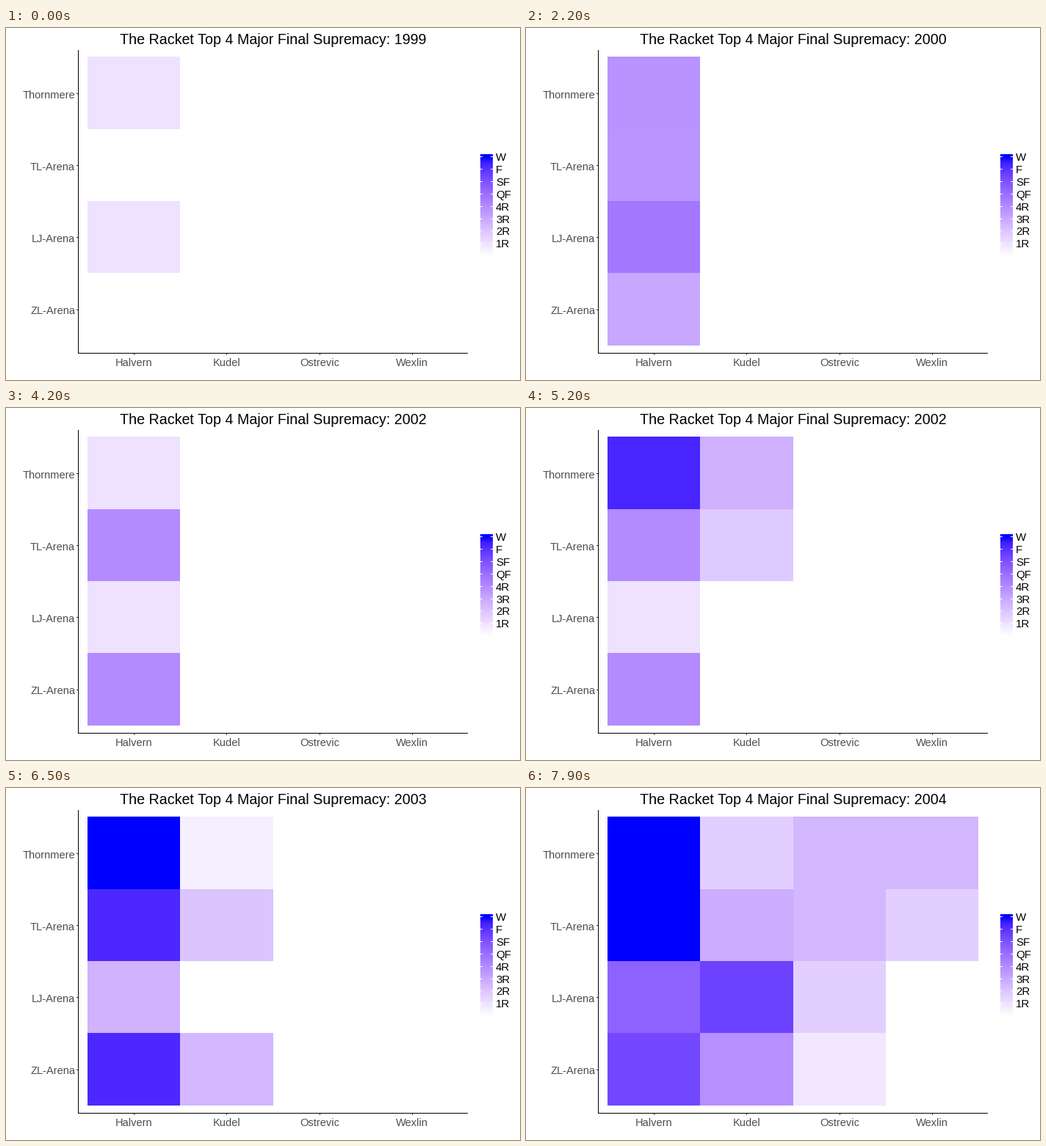
A matplotlib script for the animation above (8000 ms loop, 700 by 480 pixels).

```python
import numpy as np
import matplotlib.pyplot as plt
from matplotlib.animation import FuncAnimation
from matplotlib.patches import Rectangle

W, H, DPI = 700, 480, 100
INTERVAL, FRAMES, FRAMES_PER_YEAR = 100, 80, 14
FIRST_YEAR = 1999
TITLE = "The Racket Top 4 Major Final Supremacy: {}"

PLAYERS = ["Halvern", "Kudel", "Ostrevic", "Wexlin"]
EVENTS = ["Thornmere", "TL-Arena", "LJ-Arena", "ZL-Arena"]
ROUNDS = ["W", "F", "SF", "QF", "4R", "3R", "2R", "1R"]

# One string per player and year: round reached (8 = won) in event order.
RESULTS = [
    ["1010", "0000", "0000", "0000"],
    ["1343", "0000", "0000", "0000"],
    ["5453", "0000", "0000", "0000"],
    ["1414", "0000", "0000", "0000"],
    ["8414", "3200", "0000", "0000"],
    ["8838", "0203", "0000", "0000"],
    ["8866", "2384", "3321", "3200"],
]
scores = np.array([[[int(c) for c in player] for player in year]
                   for year in RESULTS], float)

X_EDGES = [111, 237, 364, 490, 616]
Y_EDGES = [39, 138, 236, 334, 433]
AXIS_LEFT, AXIS_RIGHT, AXIS_TOP, AXIS_BOTTOM = 98, 629, 30, 443
BAR_LEFT, BAR_RIGHT, BAR_BINS = 646, 663, 20
TICK_TOP, TICK_STEP = 175.95, 16.82

WHITE_LAB = np.array([100.0, 0.0, 0.0])
BLUE_LAB = np.array([32.30, 79.19, -107.86])
XYZ_TO_RGB = np.array([[3.2406, -1.5372, -0.4986],
                       [-0.9689, 1.8758, 0.0415],
                       [0.0557, -0.2040, 1.0570]])


def shade(score):
    """White-to-blue gradient, blended in Lab space."""
    L, a, b = WHITE_LAB + (BLUE_LAB - WHITE_LAB) * score / 8
    fy = (L + 16) / 116
    f = np.array([fy + a / 500, fy, fy - b / 200])
    xyz = np.where(f > 6 / 29, f ** 3, (f - 4 / 29) * 108 / 841)
    rgb = np.clip(XYZ_TO_RGB @ (xyz * [0.9505, 1.0, 1.089]), 0, 1)
    rgb = np.where(rgb > 0.0031308,
                   1.055 * rgb ** (1 / 2.4) - 0.055, 12.92 * rgb)
    return np.clip(rgb, 0, 1)


def ease(u):
    return 4 * u ** 3 if u < 0.5 else 1 - 4 * (1 - u) ** 3


plt.rcParams["font.family"] = "Liberation Sans"
fig = plt.figure(figsize=(W / DPI, H / DPI), dpi=DPI, facecolor="white")
ax = fig.add_axes([0, 0, 1, 1])
ax.axis("off")


def box(x0, y0, x1, y1, color, z=2):
    rect = Rectangle((x0, y0), x1 - x0, y1 - y0, facecolor=color,
                     linewidth=0, antialiased=False, zorder=z)
    return ax.add_patch(rect)


def label(x, y, text, px, color="black", ha="center"):
    return ax.text(x, y, text, fontsize=px * 72 / DPI, color=color,
                   ha=ha, va="baseline")


tiles = [[box(X_EDGES[i], Y_EDGES[j], X_EDGES[i + 1], Y_EDGES[j + 1], "white")
          for j in range(4)] for i in range(4)]

# Axes
GREY, TICK = "#4d4d4d", "#333333"
for i, name in enumerate(PLAYERS):
    x = (X_EDGES[i] + X_EDGES[i + 1]) / 2
    box(int(x), AXIS_BOTTOM, int(x) + 1, AXIS_BOTTOM + 3, TICK)
    label(x, 461, name, 14.6, GREY)
for j, name in enumerate(EVENTS):
    y = (Y_EDGES[j] + Y_EDGES[j + 1]) / 2
    row = int(y + 0.5)
    box(AXIS_LEFT - 2, row, AXIS_LEFT, row + 1, TICK)
    label(94, round(y + 7), name, 14.6, GREY, "right")
box(AXIS_LEFT, AXIS_TOP, AXIS_LEFT + 1, AXIS_BOTTOM + 1, "black", 3)
box(AXIS_LEFT, AXIS_BOTTOM, AXIS_RIGHT, AXIS_BOTTOM + 1, "black", 3)

# Colour bar
span = 8 * TICK_STEP
half_bin = span / (BAR_BINS - 1) / 2
bar = np.array([[shade(s)] for s in np.linspace(8, 0, BAR_BINS)])
ax.imshow(bar, extent=(BAR_LEFT, BAR_RIGHT, TICK_TOP + span + half_bin,
                       TICK_TOP - half_bin),
          aspect="auto", interpolation="bilinear", zorder=1)
for k, name in enumerate(ROUNDS):
    y = TICK_TOP + k * TICK_STEP
    row = int(y)
    box(BAR_LEFT, row, BAR_LEFT + 3, row + 1, "white")
    box(BAR_RIGHT - 3, row, BAR_RIGHT, row + 1, "white")
    label(667, round(y + 5.5), name, 15, ha="left")

title = label(363.5, 22, TITLE.format(FIRST_YEAR), 19.7)
ax.set_xlim(0, W)
ax.set_ylim(H, 0)


def update(frame):
    year, step = divmod(frame, FRAMES_PER_YEAR)
    p = ease(step / FRAMES_PER_YEAR)
    now = scores[year] * (1 - p) + scores[year + 1] * p
    for i in range(4):
        for j in range(4):
            tiles[i][j].set_facecolor(shade(now[i, j]))
    title.set_text(TITLE.format(FIRST_YEAR + year))
    return [title]


anim = FuncAnimation(fig, update, frames=FRAMES, interval=INTERVAL,
                     repeat=True, repeat_delay=0, blit=False)
plt.show()
```
